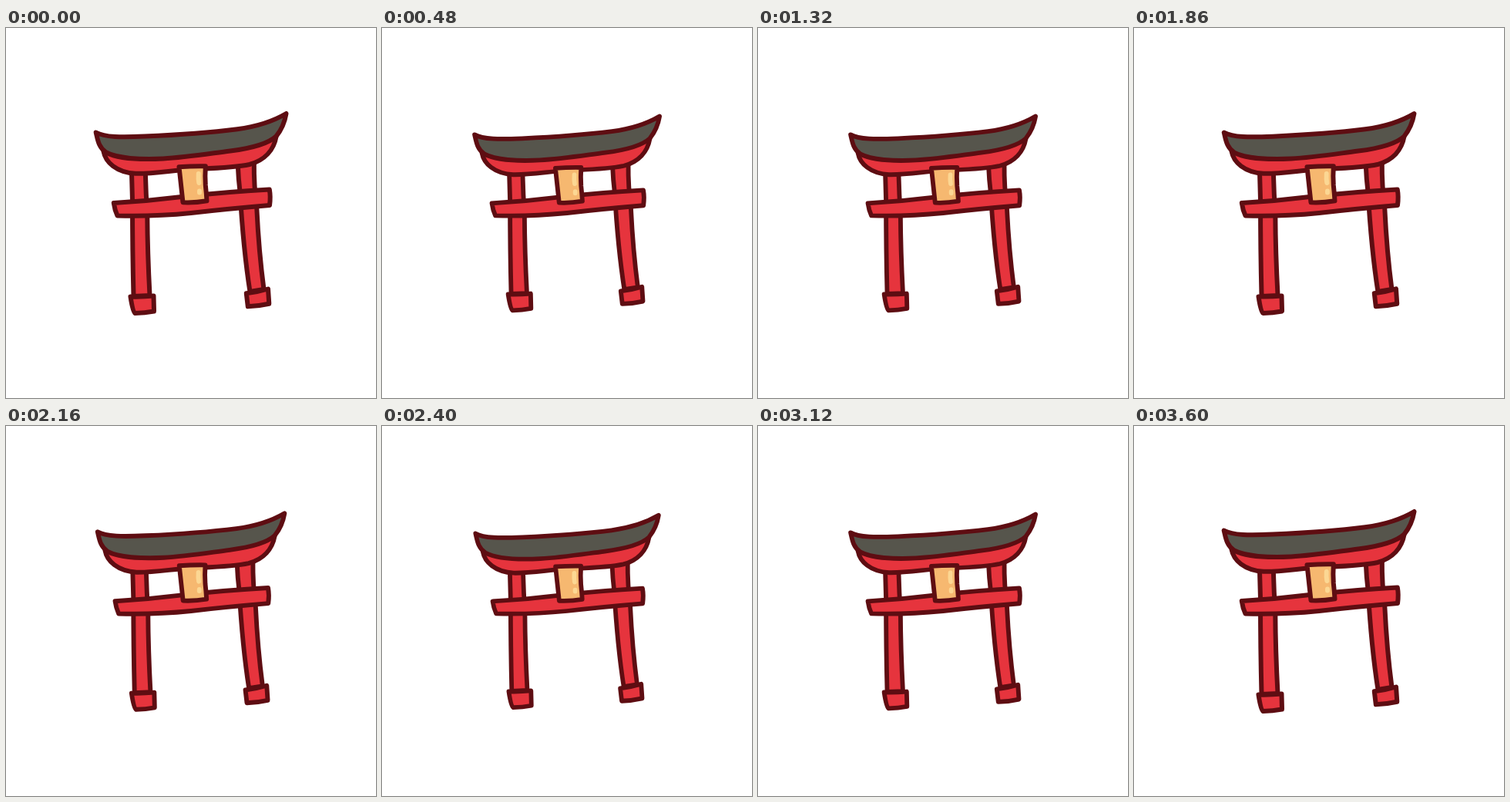
These frames come from a looping animation (480 px wide and 480 px high, 3.63 s). An HTML page:

```html
<!DOCTYPE html>
<html lang="en">
<head>
<meta charset="utf-8">
<title>Torii gate</title>
<style>
  html, body { margin: 0; width: 100%; height: 100%; overflow: hidden; background: #fff; }
  svg { display: block; width: 100vw; height: 100vh; }
  #gate { stroke: #5e0d12; stroke-width: 6; stroke-linejoin: round; stroke-linecap: round; fill: #e6343d; }
  #gate .roof { fill: #56554c; }
  #gate .plate { fill: #f6b870; }
  #gate .shine { fill: none; stroke: #fcd793; }
</style>
</head>
<body>
<svg viewBox="0 0 480 480">
  <g id="gate">
    <!-- pillars and feet -->
    <path d="M163 188Q163.500 206 164 224Q164 288 165.500 348L186.500 347Q183.500 290 183.300 243Q181.500 215 180.800 187Z"/>
    <path d="M300.800 178Q301.500 196 303.500 212Q308 288 316.500 342L334.500 339Q328 290 325.300 234Q321.500 205 321.800 174Z"/>
    <path d="M161.500 348.500Q176 349 191.500 347.500L192 367.500Q180 369.800 167.500 370Q164.500 368.500 161.500 348.500Z"/>
    <path d="M311.800 344.300Q327 342.500 340 338.500L341.300 357.800Q328 360.800 313.800 361.300Z"/>
    <!-- beam -->
    <path d="M139.800 227Q184 224.500 228 219Q286 212.500 341.800 209.500Q343.500 219 342 230Q288 234.500 240 240Q192 244.800 144.500 243.500Q141 236 139.800 227Z"/>
    <!-- eaves and roof -->
    <path d="M126.500 160C129 174 143 187.300 168 188.800C192 189.300 216 184.500 240 183.300C272 181.800 296 181.300 316 177C336 171.500 347.500 158 350.500 141L300 152L180 165Z"/>
    <path class="roof" d="M116.700 135.500C128 142 150 141.800 180 140.600C224 138.600 268 135.200 300 131.200C327 127.700 347 120.700 363.500 111C361.500 123 357.500 132 350.500 140.500C341 149.500 318 156 291 159.500C260 163.500 232 168 204 169.500C174 171 144 169 130 161.500C120 155 119 145 116.700 135.500Z"/>
    <!-- name plate -->
    <path class="plate" d="M224.500 180.200Q242 179 258.800 179.300Q258 192 258.800 204Q260 215 260.500 224.300Q245 227 229.500 226.300Q227 204 224.500 180.200Z"/>
    <path class="shine" d="M249.800 189Q249.300 196 250.300 201M251 211.500v2"/>
  </g>
</svg>
<script>
  const LOOP = 3630, STEP = 60, PULSE = 1800, SHRINK = 0.05;
  const gate = document.getElementById('gate');
  const start = performance.now();

  function draw(now) {
    const t = Math.floor(Math.max(0, now - start) % LOOP / STEP) * STEP;
    const dip = (1 - Math.cos(2 * Math.PI * t / PULSE)) / 2;
    const s = 1 - SHRINK * dip;
    gate.setAttribute('transform', `translate(240 240) scale(${s}) translate(-240 -240)`);
    requestAnimationFrame(draw);
  }
  draw(start);
</script>
</body>
</html>
```
